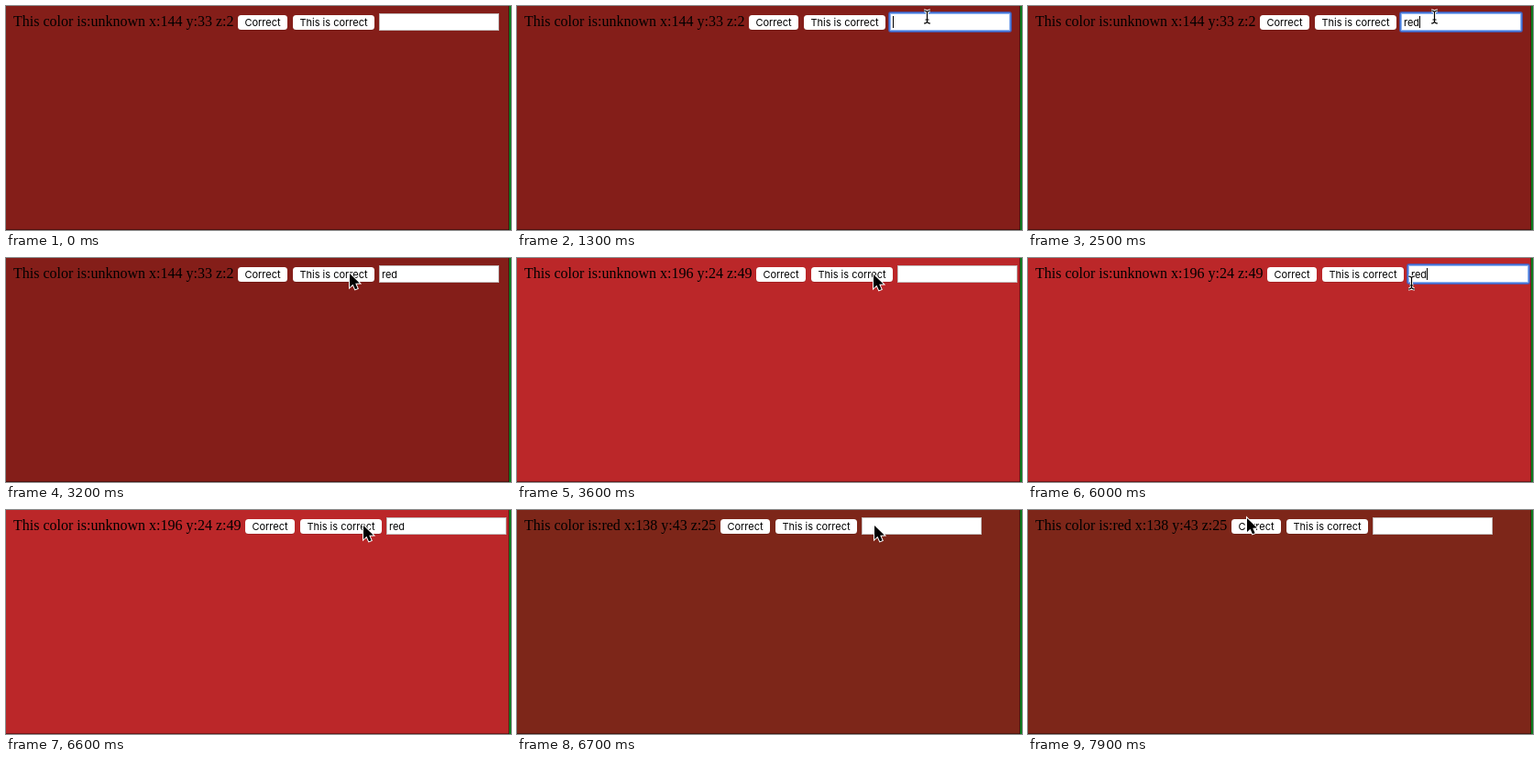
These frames come from a looping animation (551 px wide and 245 px high, 8000 ms). An HTML page with a canvas:

```html
<!DOCTYPE html>
<html lang="en">
<head>
<meta charset="utf-8">
<title>Color trainer</title>
<style>
html, body { margin: 0; width: 551px; height: 245px; overflow: hidden; background: #841e19; }
canvas { display: block; }
</style>
</head>
<body>
<canvas id="stage" width="551" height="245"></canvas>
<script>
const LOOP = 8000, STEP = 100, W = 551, H = 245;
const ctx = document.getElementById('stage').getContext('2d');
const UI_FONT = '11px Inter, "Liberation Sans", sans-serif';
const PAGE_FONT = '16px "Liberation Serif", Times, serif';

// x is the left edge of the first button; keys are [time, field value]
const scenes = [
  { at: 0, bg: '#841e19', label: 'This color is:unknown x:144 y:33 z:2', x: 253,
    blur: 3200, keys: [[1300, ''], [2000, 'r'], [2100, 're'], [2300, 'red']] },
  { at: 3300, bg: '#bb2729', label: 'This color is:unknown x:196 y:24 z:49', x: 261,
    blur: 6600, keys: [[4800, ''], [4900, ''], [5500, 'r'], [5600, 're'], [5700, 'red']] },
  { at: 6700, bg: '#7d2619', label: 'This color is:red x:138 y:43 z:25', x: 222,
    blur: LOOP, keys: [] }
];

// pointer stops: time, x, y
const path = [
  [100, 505, 244], [300, 490, 205], [500, 490, 205], [1000, 447, 12], [2400, 447, 12],
  [3100, 375, 17], [3300, 375, 17], [4400, 454, 20], [4800, 455, 22], [5000, 455, 22],
  [5800, 455, 22], [6000, 418, 27], [6500, 390, 17], [6700, 390, 17], [7600, 242, 12], [7900, 239, 9]
];
const hidden = [[0, 100], [2000, 2500], [5500, 5900]];

const last = (list, test) => list.filter(test).pop();
const sceneAt = t => last(scenes, s => s.at <= t) || scenes[0];
const fieldX = s => s.x + 154;

function pointerAt(t) {
  const i = path.findIndex(p => p[0] > t);
  if (i < 0) return path[path.length - 1].slice(1);
  if (i === 0) return path[0].slice(1);
  const [t0, x0, y0] = path[i - 1], [t1, x1, y1] = path[i];
  const u = (t - t0) / (t1 - t0), k = u * u * (3 - 2 * u);
  return [Math.round(x0 + (x1 - x0) * k), Math.round(y0 + (y1 - y0) * k)];
}

function rect(x, y, w, h, color) {
  ctx.fillStyle = color;
  ctx.fillRect(x, y, w, h);
}

function roundRect(x, y, w, h, r, color) {
  ctx.beginPath();
  ctx.roundRect(x, y, w, h, r);
  ctx.fillStyle = color;
  ctx.fill();
}

function text(str, x, y, font) {
  ctx.font = font;
  ctx.fillStyle = '#000';
  ctx.fillText(str, x, y);
}

function button(label, x, w) {
  roundRect(x, 10.5, w, 16, 3.5, 'rgba(0,0,0,.25)');
  roundRect(x, 10, w, 16, 3.5, '#fff');
  ctx.textAlign = 'center';
  text(label, x + w / 2, 22, UI_FONT);
  ctx.textAlign = 'left';
}

function field(s, t) {
  const x = fieldX(s), key = last(s.keys, k => k[0] <= t);
  const focused = key && t < s.blur;
  if (focused) {
    roundRect(x - 2, 6, 135, 23, 3, 'rgba(58,98,205,.75)');
    roundRect(x - 1, 7, 133, 21, 2, '#4a7fe0');
    rect(x, 8, 131, 19, '#8fb2ee');
  } else {
    rect(x, 8, 131, 19, '#c4bcbb');
  }
  rect(x + 1, 9, 129, 17, '#fff');
  if (!key) return;
  text(key[1], x + 3, 22, UI_FONT);
  if (focused && Math.floor((t - key[0]) / 500) % 2 === 0) {
    rect(x + 3 + Math.round(ctx.measureText(key[1]).width), 11, 1, 13, '#000');
  }
}

function arrow(x, y) {
  const pts = [[0, 0], [0, 15], [3.5, 11.8], [6, 17.3], [8.6, 16.2], [6.2, 10.8], [10.8, 10.6]];
  ctx.beginPath();
  pts.forEach(([dx, dy]) => ctx.lineTo(x + dx, y + dy));
  ctx.closePath();
  ctx.lineJoin = 'miter';
  ctx.strokeStyle = '#fff';
  ctx.lineWidth = 2;
  ctx.stroke();
  ctx.fillStyle = '#000';
  ctx.fill();
}

function beam(x, y) {
  x += 0.5;
  ctx.beginPath();
  for (const d of [-1, 1]) {
    ctx.moveTo(x - 3.5, y + d * 7);
    ctx.quadraticCurveTo(x, y + d * 7, x, y + d * 4.5);
    ctx.quadraticCurveTo(x, y + d * 7, x + 3.5, y + d * 7);
  }
  ctx.moveTo(x, y - 5);
  ctx.lineTo(x, y + 5);
  ctx.moveTo(x - 2, y + 3);
  ctx.lineTo(x + 2, y + 3);
  ctx.lineJoin = 'round';
  for (const [color, width] of [['#fff', 3], ['#000', 1.2]]) {
    ctx.strokeStyle = color;
    ctx.lineWidth = width;
    ctx.stroke();
  }
}

function pointer(t) {
  if (hidden.some(([a, b]) => t >= a && t < b)) return;
  const [x, y] = pointerAt(t);
  // the shape updates only once the pointer moves over the new layout
  const fx = fieldX(sceneAt(t - STEP));
  const inField = x >= fx && x < fx + 131 && y >= 8 && y <= 27;
  (inField ? beam : arrow)(x, y);
}

function draw(t) {
  const s = sceneAt(t);
  rect(0, 0, W, H, s.bg);
  text(s.label, 8, 22, PAGE_FONT);
  button('Correct', s.x, 54);
  button('This is correct', s.x + 60, 89);
  field(s, t);
  pointer(t);
  rect(0, H - 1, W, 1, 'rgba(0,0,0,.4)');
  rect(W - 3, 0, 1, H, 'rgba(0,0,0,.35)');
  rect(W - 2, 0, 2, H, '#0c7a1e');
}

function tick() {
  const t = performance.now() % LOOP;
  draw(Math.floor(t / STEP) * STEP);
  requestAnimationFrame(tick);
}
tick();
</script>
</body>
</html>
```
